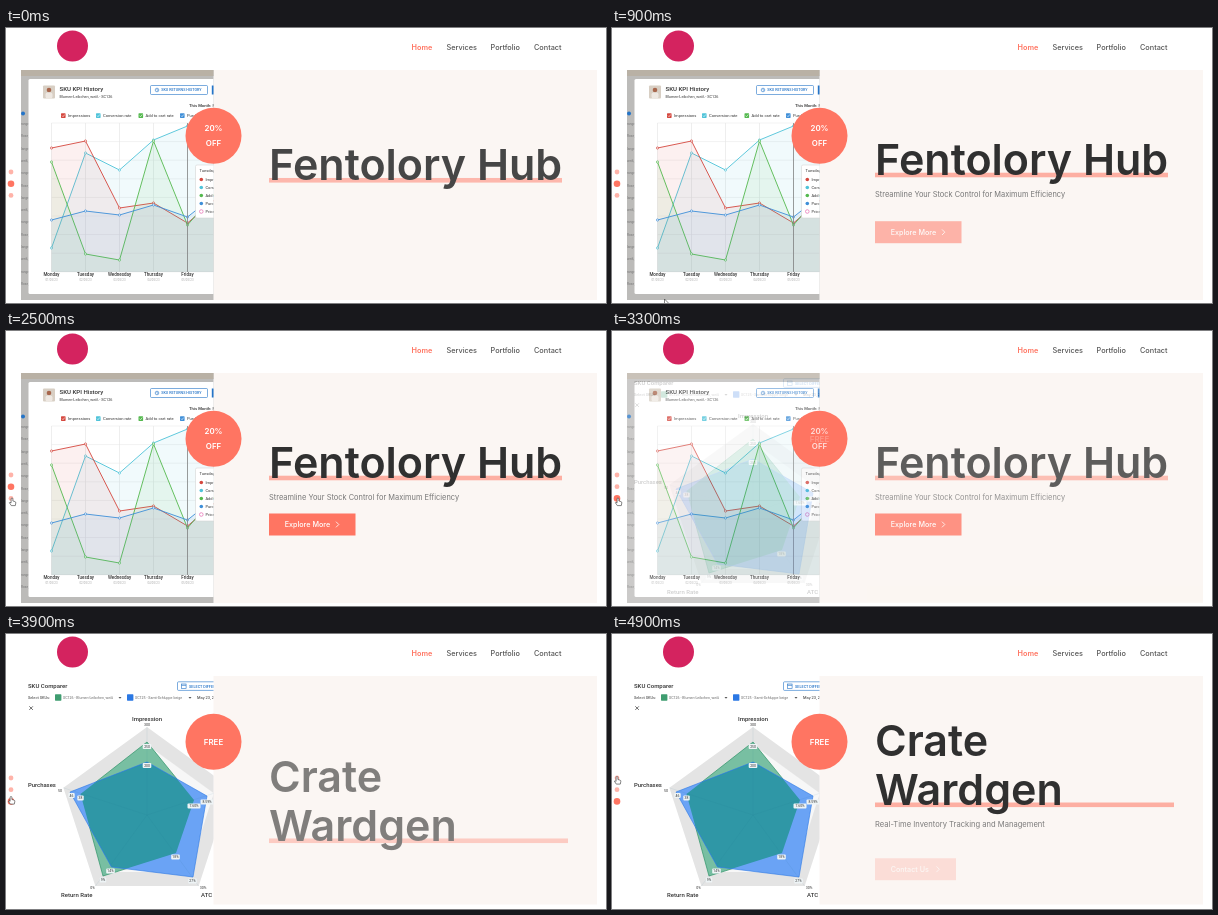
Animation, 600 px wide and 275 px high, one loop 5 s. Source, as an HTML page:

```html
<!DOCTYPE html>
<html lang="en">
<head>
<meta charset="utf-8">
<title>Shop hero slider</title>
<style>
  html, body { margin: 0; width: 100%; height: 100%; overflow: hidden; background: #fff; }
  svg { display: block; width: 600px; height: 275px; font-family: Inter, sans-serif; }
  .chart { font-family: Roboto, sans-serif; fill: #333; }
</style>
</head>
<body>
<svg id="stage" viewBox="0 0 600 275"></svg>
<script>
const CORAL = '#ff7562', BLUE = '#2474c8';
const RED = '#d5483f', CYAN = '#4fc3d9', GREEN = '#55b94f', SKY = '#3f8fd8';

// Markup helpers
const text = (x, y, size, str, attrs = '') =>
  `<text x="${x}" y="${y}" font-size="${size}" ${attrs}>${str}</text>`;
const rect = (x, y, w, h, fill, attrs = '') =>
  `<rect x="${x}" y="${y}" width="${w}" height="${h}" fill="${fill}" ${attrs}/>`;
const circle = (x, y, r, fill, attrs = '') =>
  `<circle cx="${x}" cy="${y}" r="${r}" fill="${fill}" ${attrs}/>`;
const path = (d, stroke, width = 0.7, attrs = '') =>
  `<path d="${d}" fill="none" stroke="${stroke}" stroke-width="${width}" ${attrs}/>`;
const polygon = (pts, fill, attrs = '') => `<polygon points="${pts.join(' ')}" fill="${fill}" ${attrs}/>`;
const group = (attrs, ...parts) => `<g ${attrs}>${parts.flat().join('')}</g>`;
const MID = 'text-anchor="middle" ', BOLD = 'font-weight="500"';

function historyChart() {
  const dayX = i => 45.5 + 34 * i;
  const series = [
    [CYAN, [220, 125, 142, 112, 98, 122]],
    [RED, [120, 113, 180, 175, 195, 166]],
    [GREEN, [134, 226, 232, 113, 197, 158]],
    [SKY, [192, 183, 187, 177, 189, 162]],
  ];
  const grid = [0, 1, 2, 3, 4].map(i => path(`M${dayX(i)} 95V244`, '#ddd', 0.5))
    .concat([0, 1, 2, 3, 4, 5, 6, 7, 8].map(i => path(`M45.5 ${95 + i * 18.6}H208`, '#e4e4e4', 0.5)));
  const lines = series.map(([color, ys]) => {
    const pts = ys.map((y, i) => `${dayX(i)},${y}`);
    return polygon([`${dayX(0)},244`, ...pts, `${dayX(5)},244`], color, 'opacity=".08"')
      + path('M' + pts.join('L'), color, 0.9)
      + ys.map((y, i) => circle(dayX(i), y, 1.1, '#fff', `stroke="${color}" stroke-width=".7"`)).join('');
  });
  const legend = [[55, RED, 'Impressions'], [90, CYAN, 'Conversion rate'], [132.5, GREEN, 'Add to cart rate'], [174, SKY, 'Purchases']]
    .map(([x, color, label]) => rect(x, 85.3, 4.6, 4.6, color, 'rx=".6"')
      + path(`M${x + 1} 87.6l1 1.1l1.8-2.2`, '#fff', 0.6) + text(x + 7, 89.2, 4.1, label));
  const days = ['Monday', 'Tuesday', 'Wednesday', 'Thursday', 'Friday'].map((day, i) =>
    text(dayX(i), 248.3, 4.5, day, MID + BOLD) + text(dayX(i), 253, 2.9, `0${i + 1}/05/23`, MID + 'fill="#aaa"'));
  const tip = [[RED, 'Impressions'], [CYAN, 'Conversion'], [GREEN, 'Add to cart'], [SKY, 'Purchases'], ['#fff', 'Price']]
    .map(([color, label], i) => circle(195.3, 151.5 + 8 * i, 1.8, color, i > 3 ? 'stroke="#e66bb0" stroke-width=".7"' : '')
      + text(199.5, 153 + 8 * i, 4, label));
  const backdrop = Array.from({ length: 14 }, (_, i) =>
    text(15, 97 + 12.3 * i, 3.2, ['range', 'Rose,', 'lange', 'weiß,'][i % 4], 'fill="#777"'));
  return group('class="chart" clip-path="url(#picture)"',
    rect(15, 42, 193, 230, '#bcbbb9'), rect(15, 42, 193, 6, '#b9b1a5'), backdrop, circle(17, 85.5, 2, BLUE),
    rect(22.5, 51, 190, 215, '#fff', 'rx="1.5"'),
    rect(37, 57.5, 12, 13, '#d8cfc4', 'rx="1"'), circle(43, 62, 2.3, '#a8674d'), rect(39.5, 64.5, 7, 6, '#eee8e2', 'rx="2"'),
    text(53.5, 63, 6.1, 'SKU KPI History', BOLD), text(53.5, 69.8, 3.8, 'Blumen-Leibchen, weiß - SC126'),
    rect(144.5, 57.5, 57, 9, '#fff', `rx="1" stroke="${BLUE}" stroke-width=".6"`),
    circle(151, 62, 1.8, 'none', `stroke="${BLUE}" stroke-width=".6"`), path('M151 60.8V62.2H152', BLUE, 0.5),
    text(155.3, 63.4, 3.7, 'SKU RETURNS HISTORY', BOLD + ` fill="${BLUE}"`), rect(205.8, 57.5, 6, 9, BLUE),
    text(183, 79, 4.2, 'This Month: May', BOLD), legend, grid, lines,
    path('M181.5 95V244', '#777', 0.7), days,
    rect(189.5, 137, 30, 53, '#fff', 'rx="1.5" stroke="#ccc" stroke-width=".5"'),
    text(193.5, 144.2, 4.1, 'Tuesday'), tip);
}

function radarChart() {
  const ring = k => [0, 1, 2, 3, 4].map(i => {
    const a = i * Math.PI * 0.4;
    return `${141 + 87.9 * k * Math.sin(a)},${181 - 87.9 * k * Math.cos(a)}`;
  });
  const green = ['141,108', '188,166', '170,219', '97,242', '74.5,160'];
  const blue = ['141,128', '201,162', '187,243', '105.5,233', '64,158'];
  const tags = [[141, 112.5, '250'], [141, 131.5, '200'], [188, 172, '7.60%'], [201, 168, '8.59%'], [169.5, 223, '18%'],
    [186.5, 247, '27%'], [104.5, 237, '14%'], [97, 246, '9%'], [65.5, 161.5, '46'], [74.5, 164, '38']]
    .map(([x, y, s]) => rect(x - s.length * 1.1 - 1, y - 2.4, s.length * 2.2 + 2, 4.8, '#eef4f6', 'rx="1"')
      + text(x, y + 1.2, 3.4, s, MID));
  const scale = [[141, 92, '300'], [54, 158, '50'], [86.5, 255, '0%'], [197, 255, '30%']]
    .map(([x, y, s]) => text(x, y, 3.6, s, MID));
  const picker = (x, color, label, caret) => rect(x, 60.3, 6.4, 6.4, color, 'rx=".6"')
    + text(x + 8, 65, 3.6, label, 'fill="#666"') + polygon([`${caret},63`, `${caret + 3},63`, `${caret + 1.5},64.7`], '#555');
  return group('class="chart" clip-path="url(#picture)"',
    text(22, 54, 6, 'SKU Comparer', BOLD),
    rect(171.5, 47.8, 50, 8.6, '#fff', `rx="1" stroke="${BLUE}" stroke-width=".6"`),
    rect(175.5, 50, 4.6, 4.3, 'none', `stroke="${BLUE}" stroke-width=".6"`), path('M175.5 51.3H180', BLUE),
    text(183, 53.6, 3.8, 'SELECT DIFFERENT', BOLD + ` fill="${BLUE}"`),
    text(22, 65, 3.9, 'Select SKUs:'),
    picker(49, '#3f9d70', 'SC126 - Blumen-Leibchen, weiß', 112.5),
    picker(121, '#2b78e4', 'SC125 - Samt-Schluppe beige', 182.5),
    text(191, 65, 4, 'May 23, 2023'), path('M23.3 72.3l3.6 3.6m0-3.6l-3.6 3.6', '#333', 0.7),
    [1, 0.8, 0.6, 0.4, 0.2].map((k, i) => polygon(ring(k), i % 2 ? '#f7f7f7' : '#e4e4e4')),
    polygon(green, '#78bfa2', 'stroke="#2f9268" stroke-width=".7"'),
    polygon(blue, '#6aa3f5'),
    `<clipPath id="overlap">${polygon(green, '#000')}</clipPath>`,
    polygon(blue, '#2f97a6', 'clip-path="url(#overlap)"'),
    ring(1).map(p => path(`M141,181L${p}`, '#1d6d80', 0.3, 'opacity=".25"')),
    polygon(blue, 'none', 'stroke="#2b78e4" stroke-width=".6"'),
    tags, scale,
    text(141, 87, 6, 'Impression', MID + BOLD), text(22, 153, 5.9, 'Purchases', BOLD),
    text(55, 263, 6, 'Return Rate', BOLD), text(195, 263, 6, 'ATC', BOLD));
}

function badge(...lines) {
  return circle(207.5, 107.8, 28, CORAL) + lines.map((line, i) =>
    text(207.5, 110.6 + 14.6 * (i - (lines.length - 1) / 2), 7.9, line, MID + 'font-weight="600" fill="#fff"')).join('');
}

// Title, tagline and button are separate groups so each can rise on its own.
function copy(id, { title, lineY, lineW, tagline, tagSize, button, buttonW }) {
  const top = lineY + 35.5;
  return group(`id="${id}-title"`, rect(263, lineY - 2.3, lineW, 4.6, CORAL, 'opacity=".55"'),
      title.map((s, i) => text(263, lineY + 0.1 - 49.3 * (title.length - 1 - i), 43, s, 'font-weight="600" fill="#303030"')))
    + group(`id="${id}-tagline"`, text(263, lineY + 22, tagSize, tagline, 'fill="#777"'))
    + group(`id="${id}-button"`, rect(263, top, buttonW, 22, CORAL),
      text(278.7, top + 13.6, 7.2, button, BOLD + ' fill="#fff"'),
      path(`M${263 + buttonW - 19.5} ${top + 8.2}l2.8 2.8l-2.8 2.8`, '#fff', 0.8));
}

const nav = [[405.5, 'Home'], [440.5, 'Services'], [484.5, 'Portfolio'], [528, 'Contact']]
  .map(([x, s], i) => text(x, 21.7, 7.3, s, `font-weight="${i ? 500 : 600}" fill="${i ? '#555' : CORAL}"`));

const stage = document.getElementById('stage');
stage.innerHTML = [
  '<clipPath id="picture"><rect x="15" y="42" width="192.5" height="230"/></clipPath>',
  circle(66.5, 18, 15.5, '#d4235f'), nav,
  rect(207.5, 42, 383.5, 228.5, '#fbf6f3'), radarChart(), badge('FREE'),
  copy('b', { title: ['Crate', 'Wardgen'], lineY: 170.8, lineW: 299, tagline: 'Real-Time Inventory Tracking and Management',
    tagSize: 7.6, button: 'Contact Us', buttonW: 81 }),
  group('id="front"', rect(15, 42, 192.5, 230, '#fff'), rect(207.5, 42, 383.5, 230, '#fbf6f3'),
    historyChart(), badge('20%', 'OFF'),
    copy('a', { title: ['Fentolory Hub'], lineY: 147, lineW: 293, tagline: 'Streamline Your Stock Control for Maximum Efficiency',
      tagSize: 7.45, button: 'Explore More', buttonW: 86.5 })),
  [0, 1, 2].map(i => circle(5, 144 + 11.7 * i, 2.4, CORAL, `id="dot${i}"`)),
  path('M0 0V6.2L1.5 4.9L2.5 7L3.4 6.6L2.5 4.5H4.4Z', '#333', 0.6, 'id="arrow" style="fill:#fff"'),
  path('M0 0Q.9 0 .9 1V3L3 3.6Q4 3.9 3.8 5L3.3 7.6H-.7L-2.6 4.7Q-2.2 3.8-.9 4.8V1Q-.9 0 0 0Z', '#333', 0.6, 'id="hand" style="fill:#fff"'),
].flat().join('');
const el = id => document.getElementById(id);

// CSS "ease": cubic-bezier(.25, .1, .25, 1)
function ease(x) {
  if (x <= 0) return 0;
  if (x >= 1) return 1;
  const bezier = (p1, p2, s) => 3 * p1 * s * (1 - s) ** 2 + 3 * p2 * s * s * (1 - s) + s ** 3;
  let lo = 0, hi = 1;
  for (let i = 0; i < 24; i++) {
    const mid = (lo + hi) / 2;
    if (bezier(0.25, 0.25, mid) < x) lo = mid; else hi = mid;
  }
  return bezier(0.1, 1, lo);
}

function rise(id, t, start, distance) {
  const p = ease((t - start) / 1000);
  el(id).setAttribute('opacity', p);
  el(id).setAttribute('transform', `translate(0 ${(1 - p) * distance})`);
}

const pointerTrack = [[0, 62, 290], [800, 56, 279], [900, 52.5, 271], [1200, 19, 200], [1400, 8, 168], [1700, 7.5, 165],
  [2200, 6, 167], [3700, 6, 167], [3900, 5, 162.5], [4100, 5, 161], [4400, 6.5, 147], [4600, 5, 142.5], [5000, 5, 142.5]];

function pointerAt(t) {
  const i = pointerTrack.findIndex(k => k[0] > t);
  const [t0, x0, y0] = pointerTrack[i - 1], [t1, x1, y1] = pointerTrack[i];
  const p = (t - t0) / (t1 - t0);
  return [x0 + (x1 - x0) * p, y0 + (y1 - y0) * p];
}

const LOOP = 5000, STEP = 100, SWITCH = 3180, FADE = 700;

function draw(t) {
  [['a', -600, 46], ['b', 3550, 91]].forEach(([id, start, height]) => {
    rise(id + '-title', t, start, height);
    rise(id + '-tagline', t, start + 600, 12);
    rise(id + '-button', t, start + 1200, 22);
  });
  el('front').setAttribute('opacity', 1 - ease((t - SWITCH) / FADE));

  const active = t > SWITCH ? 2 : 1;
  for (let i = 0; i < 3; i++) {
    el('dot' + i).setAttribute('r', i === active ? 3.3 : 2.4);
    el('dot' + i).setAttribute('opacity', i === active ? 1 : 0.55);
  }

  const [x, y] = pointerAt(t);
  const overDot = (t >= 2200 && t < 4200) || t >= 4600;
  for (const id of ['arrow', 'hand']) {
    el(id).setAttribute('transform', `translate(${x} ${y})`);
    el(id).setAttribute('visibility', (id === 'hand') === overDot ? 'visible' : 'hidden');
  }
}

const began = performance.now();
function tick() {
  const t = (performance.now() - began) % LOOP;
  draw(Math.floor(t / STEP) * STEP);
  requestAnimationFrame(tick);
}
tick();
</script>
</body>
</html>
```
